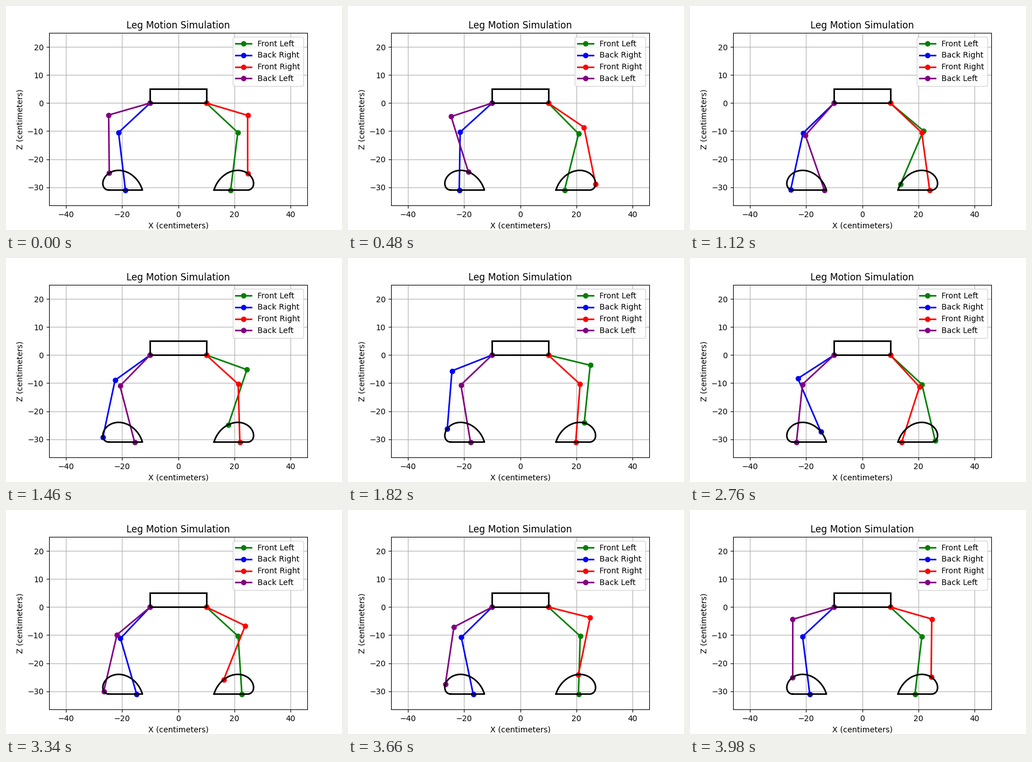
Write a matplotlib script that moves like this. It is 600 px wide and 400 px high and loops after 4000 ms.

```python
import math

import matplotlib.pyplot as plt
import numpy as np
from matplotlib.animation import FuncAnimation
from matplotlib.patches import Rectangle

FRAMES = 200
HALF = FRAMES // 2
THIGH, SHIN = 15.38, 20.66
HIP_X = 10
GROUND = -31

# Control points of the front foot's swing, relative to the ground
SWING_X = (12.75, 14.94, 24.33, 29.75, 27.2, 24.75)
SWING_Z = (0, 7.5, 12, 3.5, 0, 0)


def bezier(points, u):
    n = len(points) - 1
    return sum(math.comb(n, i) * u**i * (1 - u)**(n - i) * p
               for i, p in enumerate(points))


def front_path():
    u = np.linspace(0, 1, HALF)
    x = np.concatenate([bezier(SWING_X, u),
                        np.linspace(SWING_X[-1], SWING_X[0], HALF)])
    z = np.concatenate([bezier(SWING_Z, u), np.zeros(HALF)]) + GROUND
    return np.column_stack([x, z])


def back_path(front):
    """Mirror the front path and walk it the other way, swing first."""
    swing, stance = front[:HALF], front[HALF:]
    return np.concatenate([swing[::-1], stance[::-1]]) * (-1, 1)


def leg_points(side, foot):
    """Hip, knee and foot, with the knee bent outwards."""
    dx, dz = side * foot[0] - HIP_X, foot[1]
    reach = min(math.hypot(dx, dz), THIGH + SHIN)
    bend = math.acos((THIGH**2 + reach**2 - SHIN**2) / (2 * THIGH * reach))
    angle = math.atan2(dz, dx) + bend
    knee = HIP_X + THIGH * math.cos(angle), THIGH * math.sin(angle)
    return (side * HIP_X, side * knee[0], foot[0]), (0, knee[1], foot[1])


front = front_path()
back = back_path(front)

fig, ax = plt.subplots(figsize=(6, 4), dpi=100)
ax.set_xlim(-46, 46)
ax.set_ylim(-36.45, 25)
ax.set_aspect("equal")
ax.set_xticks(range(-40, 41, 20))
ax.set_yticks(range(-30, 21, 10))
ax.grid(True)
ax.set_title("Leg Motion Simulation")
ax.set_xlabel("X (centimeters)")
ax.set_ylabel("Z (centimeters)")

# label, colour, side, foot path, phase in frames
LEGS = [
    ("Front Left", "green", 1, front, HALF + HALF // 2),
    ("Back Right", "blue", -1, back, HALF + HALF // 2),
    ("Front Right", "red", 1, front, HALF // 2),
    ("Back Left", "purple", -1, back, HALF // 2),
]
lines = [ax.plot([], [], "o-", color=color, lw=2, label=label)[0]
         for label, color, *_ in LEGS]

for path in (front, back):
    ax.plot(*path.T, color="black", lw=2)
ax.add_patch(Rectangle((-HIP_X, 0), 2 * HIP_X, 5, fill=False, lw=2, zorder=3))
ax.legend(loc="upper right")


def update(frame):
    for line, (_, _, side, path, phase) in zip(lines, LEGS):
        line.set_data(*leg_points(side, path[(frame + phase) % FRAMES]))
    return lines


anim = FuncAnimation(fig, update, frames=FRAMES, interval=20,
                     repeat=True, repeat_delay=0)
plt.show()
```
